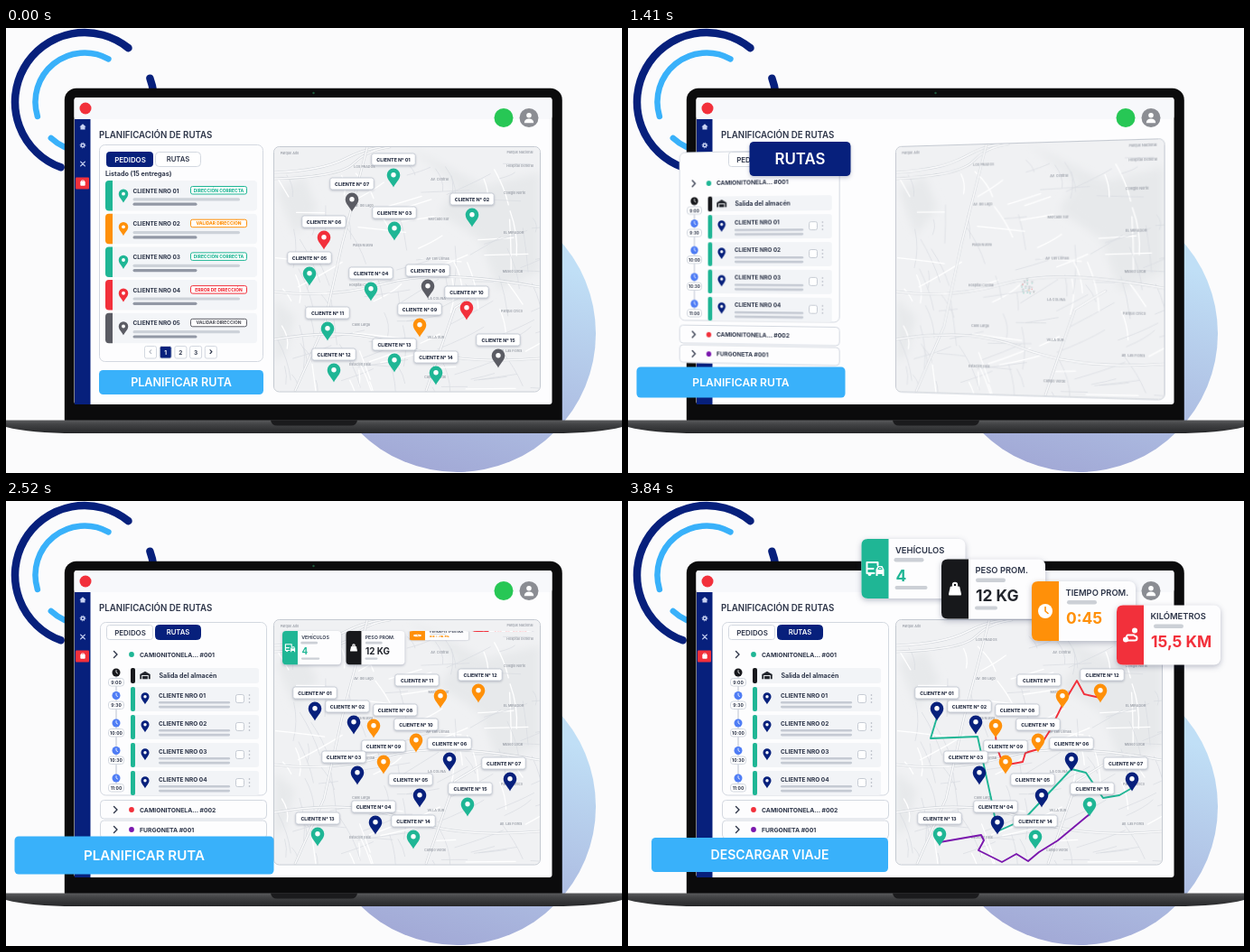
Recreate the animation shown at these times as an HTML page. Size 682 by 493 pixels, loop 4110 ms.

```html
<!DOCTYPE html>
<html lang="es">
<head>
<meta charset="utf-8">
<title>Planificación de rutas</title>
<style>
html, body { margin: 0; width: 100%; height: 100%; overflow: hidden; background: #fbfbfc; }
#stage { position: relative; width: 682px; height: 493px; overflow: hidden; }
svg { position: absolute; left: 0; top: 0; width: 682px; height: 493px; overflow: visible; }
text { font-family: Inter, sans-serif; font-weight: 600; }
#map { transform-origin: 297px 267px; }
#panel { transform-origin: 288px 253px; }
.lift { filter: drop-shadow(0 2px 3px rgba(30, 40, 80, .3)); }
.tag { filter: drop-shadow(0 1px 1px rgba(40, 50, 80, .25)); }
</style>
</head>
<body>
<div id="stage">
  <svg id="base"></svg>
  <svg id="map"></svg>
  <svg id="panel"></svg>
  <svg id="top"></svg>
</div>
<script>
const LOOP = 4110, STEP = 30;
const NAVY = '#07207c', TEAL = '#1fb695', RED = '#f2303b', ORANGE = '#ff9009',
  GRAY = '#5b5c64', PURPLE = '#7a17ad', BLUE = '#39b1fa', INK = '#2c3448', LINE = '#d3d8e0';
const $ = id => document.getElementById(id);

// Markup helpers
const rect = (x, y, w, h, r, fill, more = '') =>
  `<rect x="${x}" y="${y}" width="${w}" height="${h}" rx="${r}" fill="${fill}" ${more}/>`;
const circle = (x, y, r, fill, more = '') => `<circle cx="${x}" cy="${y}" r="${r}" fill="${fill}" ${more}/>`;
const text = (x, y, s, size, fill = INK, more = '') =>
  `<text x="${x}" y="${y}" font-size="${size}" fill="${fill}" ${more}>${s}</text>`;
const stroke = (d, color, w = 1, more = '') =>
  `<path d="${d}" fill="none" stroke="${color}" stroke-width="${w}" stroke-linecap="round" stroke-linejoin="round" ${more}/>`;
const group = (x, y, s, body, more = '') => `<g transform="translate(${x} ${y}) scale(${s})" ${more}>${body}</g>`;
const box = (x, y, w, h, r, fill = '#fdfdfe') => rect(x, y, w, h, r, fill, `stroke="${LINE}"`);
const MID = 'text-anchor="middle"', BOLD = 'style="font-weight:700"', HEAVY = 'style="font-weight:800"';

const pin = (x, y, color, s = 1) => group(x, y, s,
  `<path d="M0 12.5C-2 8-7.3 4-7.3-1.2A7.3 7.3 0 0 1 7.3-1.2C7.3 4 2 8 0 12.5Z" fill="${color}"/>` +
  circle(0, -1.2, 2.7, '#fff'));

const polar = (r, deg) => {
  const a = deg * Math.PI / 180;
  return `${87 + r * Math.cos(a)} ${82 + r * Math.sin(a)}`;
};
const arc = (r, from, to, color, w) => stroke(
  `M${polar(r, from)}A${r} ${r} 0 ${Math.abs(to - from) > 180 ? 1 : 0} ${to > from ? 1 : 0} ${polar(r, to)}`, color, w);

// Small icons centred on 0,0
const icons = {
  home: '<path d="M-4 0L0-3.6 4 0H2.8V3.4H-2.8V0Z" fill="#c9d3f2"/>',
  gear: circle(0, 0, 2, 'none', 'stroke="#c9d3f2" stroke-width="1.8"') +
    circle(0, 0, 3.2, 'none', 'stroke="#c9d3f2" stroke-dasharray="1.25 1.25"'),
  tools: stroke('M-2.6-2.6L2.6 2.6M2.6-2.6L-2.6 2.6', '#c9d3f2', 1.4),
  bag: rect(-3, -2.4, 6, 5.4, 1, '#fff') + stroke('M-1.5-2.4V-3.4H1.5V-2.4', '#fff', .9),
  store: '<path d="M-6-1L0-4.5 6-1V4.5H4V0H-4V4.5H-6Z" fill="#22252c"/>' + rect(-3, 1, 6, 3.5, 0, '#22252c'),
  van: stroke('M-1 5H-9V-7H3V-4M-9 0H-2', '#fff', 2) + circle(-6, 6, 2, '#fff') +
    '<path d="M1 1L3-3H8L10 1V8H8V6H3V8H1Z" fill="#fff"/>' + stroke('M3.6.3L4.4-1.4H6.8L7.6.3Z', TEAL, 1),
  weight: '<path d="M-4-3H4Q5-3 5.3-2L7 5.5Q7.2 7 6 7H-6Q-7.2 7-7 5.5L-5.3-2Q-5-3-4-3Z" fill="#fff"/>' +
    circle(0, -4.5, 2.2, 'none', 'stroke="#fff" stroke-width="2"'),
  clock: circle(0, 0, 8, '#fff') + stroke('M0-4.5V0L3 2.5', ORANGE, 1.6),
  route: circle(5, -5, 3, '#fff') + circle(-5, 5, 3, '#fff') +
    stroke('M4 0H-3A2.5 2.5 0 0 0-3 4M-3 6H5A2.5 2.5 0 0 0 5 1', '#fff', 2)
};

// Backdrop, laptop and the order list
function drawBase() {
  let s = `<defs>
    <linearGradient id="disc" x1=".65" y1=".1" x2=".4" y2="1"><stop offset=".1" stop-color="#c0dff6"/><stop offset="1" stop-color="#a2a9d6"/></linearGradient>
    <linearGradient id="deck" x1="0" y1="0" x2="0" y2="1"><stop offset="0" stop-color="#5a5b5d"/><stop offset=".3" stop-color="#434446"/><stop offset="1" stop-color="#262729"/></linearGradient>
    <clipPath id="cut"><rect id="wipe" x="0" y="120" width="300" height="260"/></clipPath></defs>`;
  s += circle(499.5, 338.5, 153.5, 'url(#disc)');
  s += arc(77, -51, -250, NAVY, 8.5) + arc(77, -20, 5, NAVY, 8.5);
  s += arc(54.5, -61, -197, BLUE, 6.5) + arc(54.5, 133, 95, BLUE, 6.5);
  s += rect(64.8, 66.8, 551, 380, 13, '#0b0b0c');
  s += circle(340.5, 72, 1.2, '#1d5a3c');
  s += '<path d="M0 434.5H682V442Q655 449 605 449H77Q27 449 0 442Z" fill="url(#deck)"/>';
  s += '<path d="M293 434.5H389Q388 440.5 382 440.5H300Q294 440.5 293 434.5Z" fill="#1b1b1d"/>';
  s += rect(75.5, 77, 529, 340, 3, '#fdfdfe') + rect(75.5, 77, 529, 24, 3, '#f7f8fb');
  s += rect(76, 101, 17.5, 316, 0, NAVY) + circle(88, 89, 6.5, RED);
  s += rect(77, 165.5, 15, 13, 1, RED);
  ['home', 'gear', 'tools', 'bag'].forEach((n, i) => s += group(85, [109.5, 130, 150.5, 172][i], .9, icons[n]));
  s += circle(551, 99.5, 10.5, '#27c755') + circle(579, 99.5, 10.5, '#8b8d93');
  s += circle(579, 96.7, 2.8, '#fff') + '<path d="M573.8 105.2Q574 100.6 579 100.6T584.2 105.2Z" fill="#fff"/>';
  s += text(103, 121.5, 'PLANIFICACIÓN DE RUTAS', 9.7);

  let list = box(103.5, 129.5, 181, 240, 6) + text(110, 163.5, 'Listado (15 entregas)', 7.2, INK, BOLD);
  const states = [[TEAL, 'DIRECCIÓN CORRECTA'], [ORANGE, 'VALIDAR DIRECCIÓN'], [TEAL, 'DIRECCIÓN CORRECTA'],
    [RED, 'ERROR DE DIRECCIÓN'], [GRAY, 'VALIDAR DIRECCIÓN']];
  states.forEach(([c, label], i) => {
    const y = 169 + i * 36.7;
    list += rect(110, y, 168, 33.5, 4, '#f3f5f8') +
      `<path d="M118 ${y}V${y + 33.5}H114Q110 ${y + 33.5} 110 ${y + 29.5}V${y + 4}Q110 ${y} 114 ${y}Z" fill="${c}"/>` +
      pin(130, y + 15.5, c, .72) + text(140.5, y + 13.5, 'CLIENTE NRO 0' + (i + 1), 6.4, INK, BOLD) +
      rect(204.5, y + 6.5, 62, 8.5, 2, '#fff', `stroke="${c}"`) +
      text(235.5, y + 12.5, label, 4.9, c, MID + ' ' + HEAVY) +
      rect(140.5, y + 19.3, 118.5, 3.2, 1.6, '#cdd2d9') + rect(140.5, y + 24.6, 71, 3.2, 1.6, '#9298a5');
  });
  ['‹', '1', '2', '3', '›'].forEach((n, i) => {
    const x = 153.5 + i * 16.7, on = i === 1;
    list += box(x, 352.5, 13, 13.5, 2, on ? NAVY : '#fff') +
      text(x + 6.5, 361.8, n, n > '9' ? 10 : 6.5, on ? '#fff' : i ? INK : '#b8bdc6', MID + ' ' + BOLD);
  });
  $('base').innerHTML = s + `<g clip-path="url(#cut)">${list}</g>`;
}

// Map with its two sets of pins: number, x, y, colour, label offset
const before = [[1, 429, 164, TEAL], [7, 383, 191, GRAY], [2, 516, 208, TEAL], [3, 430, 223, TEAL],
  [6, 352, 233, RED], [5, 336, 273, TEAL], [4, 404, 290, TEAL], [8, 467, 287, GRAY], [10, 510, 311, RED],
  [9, 458, 330, ORANGE], [11, 356, 334, TEAL], [13, 430, 369, TEAL], [14, 476, 383, TEAL],
  [12, 363, 380, TEAL], [15, 545, 364, GRAY]];
const after = [[1, 342, 231, NAVY], [2, 385, 246, NAVY, -7], [8, 407, 250, ORANGE, 24], [11, 481, 217, ORANGE, -26],
  [12, 523, 211, ORANGE, 2], [10, 454, 266, ORANGE], [6, 491, 287, NAVY], [9, 418, 290, ORANGE],
  [3, 389, 302, NAVY, -15], [5, 458, 327, NAVY, -10], [7, 558, 309, NAVY, -7], [4, 409, 357, NAVY, -2],
  [14, 451, 373, TEAL], [15, 511, 337, TEAL, 3], [13, 345, 370, TEAL]];
const routes = [
  [TEAL, 'M342 240L335 263 387 261 403 334 409 366 438 353 491 297 507 301 526 329 544 326 558 318'],
  [RED, 'M407 259L408 272 418 299 421 292 437 289 440 279 454 275 466 256 481 226 497 199 505 214 523 218'],
  [PURPLE, 'M345 378L391 370 394 376 388 387 414 400 430 391 443 399 455 389 476 376 511 347']];

const marker = ([n, x, y, c, dx = 0]) => pin(x, y, c) +
  `<g class="tag">${rect(x + dx - 24.2, y - 25, 48.4, 13, 2.5, '#fff', 'stroke="#c6cbd4" stroke-width=".9"')}` +
  text(x + dx, y - 16.5, 'CLIENTE N° ' + String(n).padStart(2, '0'), 5.3, INK, MID + ' ' + HEAVY) + '</g>';

function drawMap() {
  let seed = 11;
  const rnd = () => (seed = seed * 16807 % 2147483647) / 2147483647;
  let s = `<defs><clipPath id="land">${rect(297, 132, 294, 270.5, 6, '#000')}</clipPath>
    <filter id="soft"><feGaussianBlur stdDeviation="5"/></filter></defs><g clip-path="url(#land)">`;
  s += rect(297, 132, 294, 271, 6, '#f0f1f3');
  s += `<g filter="url(#soft)" fill="#e7e9eb"><path d="M445 132L500 175 480 205 525 235 545 290 591 270V160L530 175Z"/>
    <path d="M300 180L330 165 345 200 320 230Z"/><path d="M297 300L320 320 310 360 297 370Z"/></g>`;
  for (let i = 0; i < 130; i++) {
    const a = (i % 2 ? -.22 : 1.3) + (rnd() - .5) * .7, l = 15 + rnd() * 42;
    const x = 297 + rnd() * 290, y = 150 + rnd() * 250, dx = Math.cos(a) * l, dy = Math.sin(a) * l;
    s += stroke(`M${x} ${y}q${dx / 2 + rnd() * 6} ${dy / 2} ${dx} ${dy}`, i % 3 ? '#d9dce1' : '#fff', i % 3 ? .7 : 1.3);
  }
  ['M297 160Q350 158 375 145T420 132', 'M297 167Q370 165 385 150T425 132', 'M297 292Q360 300 420 283T591 287',
    'M320 402L352 330 372 240 400 132', 'M297 345Q380 330 440 352T591 366', 'M465 402L497 310 530 290'].forEach(d =>
    s += stroke(d, '#d0d4d9', 2.6) + stroke(d, '#fbfbfc', 1.5));
  ['Parque Alto', 'LOS PRADOS', 'Av. Central', 'Colegio Norte', 'Av. del Lago', 'Mercado Sur', 'EL MIRADOR',
    'Plaza Nueva', 'Av. Las Lomas', 'Museo Local', 'Hospital Central', 'LA COLINA', 'Parque Chico', 'Calle Larga',
    'VILLA SUR', 'Av. Las Flores', 'Estación Este', 'Campo Verde'].forEach((n, i) =>
    s += text(314 + i * 83 % 250, 140 + i * 14.6, n, 3.7, '#9a9fa8', MID));
  s += text(569, 139, 'Parque Nacional', 3.7, '#9a9fa8', MID) + text(569, 154, 'Hospital General', 3.7, '#9a9fa8', MID);
  s += '</g>' + rect(296.5, 131.5, 295, 271.5, 6, 'none', 'stroke="#c4c9d1"');
  s += routes.map(([c, d]) => stroke(d, c, 1.9, 'class="route" pathLength="100" stroke-dasharray="100 200"')).join('');
  s += `<g id="before">${before.map(marker).join('')}</g><g id="after">${after.map(marker).join('')}</g>`;
  $('map').innerHTML = s;
}

function drawPanel() {
  const head = (y, c, s) => stroke(`M119.5 ${y - 3.5}l3.5 3.5-3.5 3.5`, INK, 1.4) + circle(139, y, 2.9, c) +
    text(148, y + 2.5, s, 6.8, INK, BOLD);
  let s = rect(104, 134, 185, 240.5, 6, '#fdfdfe');
  s += box(104.5, 134.5, 184, 191.5, 6) + head(170, TEAL, 'CAMIONITONELA... #001');
  s += stroke('M122 190V318', '#aab2c4', .8);
  ['9:00', '9:30', '10:00', '10:30', '11:00'].forEach((time, i) => {
    const y = i ? 215.5 + (i - 1) * 30.5 : 190;
    s += circle(122, y, 4.5, i ? '#4f7df5' : '#17181c') + stroke(`M122 ${y - 2.4}V${y}l1.6 1`, '#fff', .8);
    s += box(113.5, y + 6.5, 17, 8.5, 3, '#fff') + text(122, y + 12.7, time, 5, INK, MID + ' ' + BOLD);
  });
  s += rect(138, 185, 142, 17, 3, '#f2f4f7') + rect(138, 185, 5, 17, 2, '#17181c') + group(154, 193, .95, icons.store);
  s += text(169.5, 196, 'Salida del almacén', 7, INK, BOLD);
  for (let i = 0; i < 4; i++) {
    const y = 206 + i * 31;
    s += rect(138, y, 142, 27, 3, '#f2f4f7') + rect(138, y, 5, 27, 2, TEAL) + pin(154, y + 11.5, NAVY, .62) +
      text(169, y + 11.5, 'CLIENTE NRO 0' + (i + 1), 6.5, INK, BOLD) +
      rect(169, y + 16, 79, 2.6, 1.3, '#c5cad3') + rect(169, y + 20.8, 79, 2.6, 1.3, '#c5cad3') +
      rect(254.5, y + 8.5, 9, 9, 2, '#fff', 'stroke="#b9bfca" stroke-width=".8"') +
      [9, 13, 17].map(d => circle(269.5, y + d, .8, '#aab0bb')).join('');
  }
  s += box(104.5, 331.5, 184, 20.5, 4) + head(342, RED, 'CAMIONITONELA... #002');
  s += box(104.5, 354, 184, 20, 4) + head(364, PURPLE, 'FURGONETA #001');
  $('panel').innerHTML = s;
}

// Cards: colour, icon, title, value, value colour, bar offset, second bar, start of flip, end x, end y
const cards = [
  [TEAL, 'van', 'VEHÍCULOS', '4', TEAL, 36, 36, 2170, 258.5, 42],
  ['#17181b', 'weight', 'PESO PROM.', '12 KG', '#22252c', 38, 25, 2300, 347, 64.5],
  [ORANGE, 'clock', 'TIEMPO PROM.', '0:45', ORANGE, 39, 0, 2430, 447, 89],
  [RED, 'route', 'KILÓMETROS', '15,5 KM', RED, 41, 0, 2480, 541, 115.5]];

function drawTop() {
  const label = id => `<text id="${id}" ${MID}></text>`;
  const card = ([c, icon, title, value, vc, bx, bar]) => '<g class="card lift">' +
    rect(0, 0, 115, 66, 7, '#fdfdfe') + `<path d="M30 0V66H7Q0 66 0 59V7Q0 0 7 0Z" fill="${c}"/>` +
    group(15, 33, 1, icons[icon]) + text(37.5, 15.7, title, 9.4) + rect(bx, 21, 33, 4.5, 2.2, '#ccd0d6') +
    text(38, 46.7, value, 17.4, vc, BOLD) + (bar ? rect(37, 52, bar, 4, 2, '#ccd0d6') : '') + '</g>';
  $('top').innerHTML = '<rect id="tabA" x="111.5" y="137.5" width="51" height="16" rx="3"/>' +
    `<text id="nameA" x="137.5" y="148.5" font-size="7.9" ${MID}>PEDIDOS</text>` +
    '<rect id="tabB" rx="4"/>' + label('nameB') + `<rect id="button" rx="4.5" fill="${BLUE}"/>` + label('action') +
    cards.map(card).join('');
  $('nameB').textContent = 'RUTAS';
}

// Timing
const ease = p => p < .5 ? 4 * p ** 3 : 1 - 4 * (1 - p) ** 3;
const span = (t, a, b) => Math.min(1, Math.max(0, (t - a) / (b - a)));
const mix = (a, b, p) => a + (b - a) * p;
function keys(t, list, curve = ease) {
  let i = 0;
  while (i < list.length - 2 && t > list[i + 1][0]) i++;
  const [a, ...from] = list[i], [b, ...to] = list[i + 1], p = curve(span(t, a, b));
  return from.map((v, k) => mix(v, to[k], p));
}
const set = (node, attrs) => { for (const k in attrs) node.setAttribute(k, attrs[k]); };
function place(shape, label, [x, y, w, h, size]) {
  set($(shape), { x, y, width: w, height: h });
  set($(label), { x: x + w / 2, y: y + h / 2 + size * .36, 'font-size': size });
}
const paint = (tab, name, on) => {
  set($(tab), { fill: on ? NAVY : '#fff', stroke: on ? NAVY : LINE });
  set($(name), { fill: on ? '#fff' : INK });
};
const zoom = (id, s) => {
  set($(id), { transform: `translate(446.5 287) scale(${s}) translate(-446.5 -287)` });
  $(id).style.display = s > .005 ? '' : 'none';
};

function render(t) {
  const small = [165.5, 137.5, 50, 16, 7.7], large = [135, 126.5, 111, 37, 16.8];
  const rutas = t >= 120;
  paint('tabA', 'nameA', !rutas);
  paint('tabB', 'nameB', rutas);
  place('tabB', 'nameB', keys(t, [[60, ...small], [510, ...large], [2010, ...large], [2400, ...small]]));
  $('tabB').style.filter = t > 120 && t < 2390 ? 'drop-shadow(0 2px 2px rgba(20,30,80,.25))' : '';

  const wide = [9.5, 375.5, 231, 34, 12.1], big = [9.5, 371.5, 287, 42, 15.1], rest = [103, 378.5, 182.5, 28, 10.2];
  place('button', 'action', keys(t, [[60, 103, 379, 182, 27, 12.6], [510, ...wide], [1980, ...wide], [2370, ...big],
    [2550, ...big], [2910, ...rest], [3510, ...rest], [3840, 26, 373, 262, 38, 14]]));
  const word = t < 2730 ? 'PLANIFICAR RUTA' : 'DESCARGAR VIAJE';
  if ($('action').textContent !== word) $('action').textContent = word;
  set($('action'), { fill: '#fff' });

  const [cut] = keys(t, [[810, 100], [1050, 217], [1230, 300]], p => p);
  set($('wipe'), { x: cut });

  const [shift] = keys(t, [[810, -118], [1050, -101], [1350, -62], [1680, -20], [1950, -4], [2310, 0]], p => p);
  const [turn] = keys(t, [[810, -24], [1050, -19], [1350, -9], [1620, 0]], p => p);
  $('panel').style.opacity = span(t, 810, 930);
  $('panel').style.transform = `translateX(${shift}px) perspective(700px) rotateY(${turn}deg)`;

  const [tilt] = keys(t, [[960, 0], [1560, -20], [1700, -20], [1930, 0]]);
  $('map').style.transform = tilt ? `perspective(1543px) rotateY(${tilt}deg)` : 'none';
  zoom('before', 1 - ease(span(t, 960, 1560)));
  zoom('after', keys(t, [[1570, 0], [1930, 1.15], [2250, 1]])[0]);

  const drawn = ease(span(t, 2610, 3120));
  document.querySelectorAll('.route').forEach(r => {
    set(r, { 'stroke-dashoffset': 100 - 100 * drawn });
    r.style.display = drawn ? '' : 'none';
  });

  document.querySelectorAll('.card').forEach((node, i) => {
    const [start, x, y] = cards[i].slice(7), open = ease(span(t, start, start + 220));
    const go = 2885 + 12 * i, move = ease(span(t, go, go + 560)), size = mix(.565, 1, move);
    set(node, { transform: `translate(${mix(306 + i * 70.5, x, move)} ${mix(144, y, move)}) scale(${size} ${size * open})` });
    node.style.display = open ? '' : 'none';
  });
}

drawBase();
drawMap();
drawPanel();
drawTop();
const t0 = performance.now();
function tick(now) {
  const t = Math.max(0, now - t0) % LOOP;
  render(Math.floor(t / STEP) * STEP);
  requestAnimationFrame(tick);
}
render(0);
requestAnimationFrame(tick);
</script>
</body>
</html>
```
